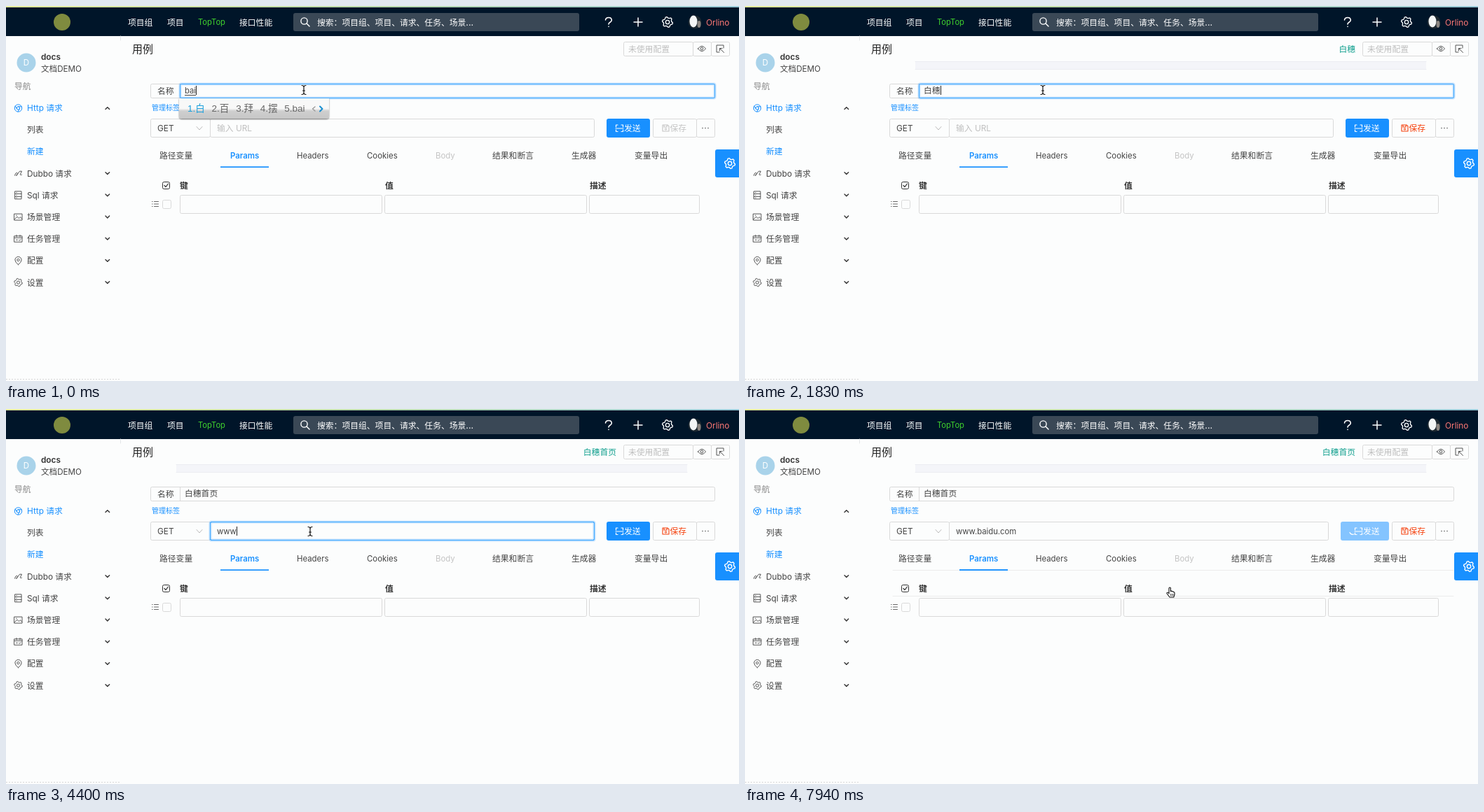
Animation, 1046 px wide and 536 px high, one loop 8 s. Source, as an HTML page:

```html
<!DOCTYPE html>
<html lang="zh-CN">
<head>
<meta charset="utf-8">
<style>
html, body { margin: 0; width: 100%; height: 100%; overflow: hidden; background: #fcfdfd; }
svg.full { position: absolute; left: 0; top: 0; }
text, .field { font: 11.8px Inter, "Noto Sans CJK SC", sans-serif; white-space: pre; }
.field { position: absolute; color: #444; }
#name { left: 255px; top: 111px; line-height: 21px; }
#url { left: 301px; top: 162px; line-height: 27px; font-size: 11.3px; }
u { font-size: 11.3px; text-underline-offset: 1.5px; }
.spell { text-decoration: underline dotted #e8504a 1.5px; text-underline-offset: 1.5px; }
.caret { display: inline-block; width: 1px; height: 13px; background: #222; vertical-align: -2px; }
.ime {
  position: absolute; top: 132px; height: 29px; line-height: 29px; padding: 0 8px 0 12px;
  display: flex; align-items: center; gap: 9.8px; white-space: nowrap; color: #666;
  font-family: "Liberation Sans", "Noto Sans CJK SC", sans-serif; font-size: 13.5px;
  background: linear-gradient(#f3f3f3, #d2d2d2); border-radius: 0 0 4px 4px;
  box-shadow: 0 1px 2px #777;
}
.ime.first { background: linear-gradient(#f8f8f8 50%, #cfcfcf 62%, #c6c6c6); }
.ime span:first-child { color: #1a9fdc; }
.ime svg { vertical-align: -2px; }
</style>
</head>
<body>
<svg class="full" id="base" width="1046" height="536"></svg>
<div id="live"></div>
<script>
const BLUE = '#1890ff', LINE = '#d9d9d9', INK = '#444';

const text = (x, y, s, c = INK, size = 11.8, weight = 400, anchor = 'start') =>
  `<text x="${x}" y="${y}" fill="${c}" text-anchor="${anchor}" style="font-size:${size}px;font-weight:${weight}">${s}</text>`;
const fill = (x1, y1, x2, y2, c, r = 0) =>
  `<rect x="${x1}" y="${y1}" width="${x2 - x1}" height="${y2 - y1}" rx="${r}" fill="${c}"/>`;
const frame = (x1, y1, x2, y2, c = LINE, w = 1, bg = 'none') =>
  `<rect x="${x1 + .5}" y="${y1 + .5}" width="${x2 - x1 - 1}" height="${y2 - y1 - 1}" rx="2" fill="${bg}" stroke="${c}" stroke-width="${w}"/>`;
const path = (d, c = '#555', w = 1, bg = 'none') =>
  `<path d="${d}" stroke="${c}" stroke-width="${w}" fill="${bg}" stroke-linecap="round" stroke-linejoin="round"/>`;
const dot = (x, y, r, c, ring = 'none', w = 1) =>
  `<circle cx="${x}" cy="${y}" r="${r}" fill="${c}" stroke="${ring}" stroke-width="${w}"/>`;
const at = (x, y, s) => `<g transform="translate(${x} ${y})">${s}</g>`;
const focusBox = (x1, y1, x2, y2) => frame(x1, y1, x2, y2, '#1890ff44', 4) + frame(x1, y1, x2, y2, '#40a9ff');

function gear(x, y, r, c, w = 1) {
  const pts = [];
  for (let i = 0; i < 24; i++) {
    const a = i * Math.PI / 12 + Math.PI / 24, k = i % 4 < 2 ? r : r * .78;
    pts.push((x + k * Math.cos(a)).toFixed(2) + ' ' + (y + k * Math.sin(a)).toFixed(2));
  }
  return path('M' + pts.join('L') + 'Z', c, w) + dot(x, y, r * .36, 'none', c, w);
}

function header() {
  return `<defs><linearGradient id="top"><stop stop-color="#e3e79a"/><stop offset=".5" stop-color="#b9d7a8"/>
    <stop offset="1" stop-color="#9bc9d8"/></linearGradient></defs>`
    + fill(0, 0, 1046, 2, 'url(#top)') + fill(0, 2, 1046, 43, '#001529')
    + dot(80, 23, 12, '#7f8b3f')
    + text(174, 27.5, '项目组', '#fff', 11.8, 500) + text(230, 27.5, '项目', '#fff', 11.8, 500)
    + text(274, 27, 'TopTop', '#3fd12e', 11.2) + text(333, 27.5, '接口性能', '#fff', 11.8, 500)
    + fill(410, 10, 818, 36, '#3a4856', 3)
    + dot(425.5, 21.5, 4.6, 'none', '#fff', 1.4) + path('M429 25L433 29', '#fff', 1.5)
    + text(444, 27.5, '搜索：项目组、项目、请求、任务、场景...', '#fff', 11.8, 500)
    + path('M855.5 20Q856 16.5 860 16.5T864.3 20Q864.3 22 862 23.3T860 26M860 29.3v.2', '#fff', 1.6)
    + path('M896 23h12M902 17v12', '#fff', 1.5) + gear(944, 23, 7.5, '#fff', 1.3)
    + dot(983, 23, 9.5, '#1d2830')
    + '<ellipse cx="981" cy="22" rx="5.5" ry="8.5" fill="#f4f6f6"/><ellipse cx="989" cy="26" rx="2.5" ry="5" fill="#8b8580"/>'
    + text(999, 28, 'Orlino', '#ff7875');
}

function sidebar() {
  const icons = [
    c => dot(0, 0, 5.2, 'none', c) + dot(0, 0, 2.2, 'none', c) + path('M0 -2.2H4.7M-1.9 1.1L-4.3 -3M1.9 1.1L-.5 5', c),
    () => path('M-5 3Q-4 -1 -2 -1T-2 3Q-5 4 -1 1L2 -3H5L3 1Q2 3 5 2'),
    () => path('M-4.5 -5.5H4.5V5.5H-4.5ZM-4.5 -2H4.5M-4.5 2H4.5M-2.5 -3.8h.3M-2.5 0h.3M-2.5 3.8h.3'),
    () => path('M-5.5 -4.5H5.5V4.5H-5.5ZM-5 3L-1.5 -.5L1 2L3 0L5 2.5M-3 -2.3h.6'),
    () => path('M-5.5 -4H5.5V4.5H-5.5ZM-5.5 -1.5H5.5M-2.5 -5.5V-3M2.5 -5.5V-3M-3 1.5H-1M1 1.5L2 2.5L3.5 .8'),
    () => path('M0 5.8Q-4.6 2 -4.6 -1A4.6 4.6 0 0 1 4.6 -1Q4.6 2 0 5.8Z') + dot(0, -1, 1.7, 'none', '#555'),
    () => gear(0, 0, 5.8, '#555')
  ];
  const names = ['Http 请求', 'Dubbo 请求', 'Sql 请求', '场景管理', '任务管理', '配置', '设置'];
  const rows = names.map((name, i) => {
    const y = i ? 208 + 31.2 * i : 146, c = i ? INK : BLUE;
    return at(17.5, y, icons[i](c)) + text(30, y + 4.3, name, c)
      + path(i ? `M142 ${y - 1.5}l2.8 2.8l2.8 -2.8` : 'M142 147.5l2.8 -2.8l2.8 2.8', '#333', 1.4);
  });
  return dot(29, 81, 13.5, '#a9d3ea') + text(29, 85, 'D', '#fff', 11.5, 400, 'middle')
    + text(50, 77, 'docs', '#333', 11.8, 600) + text(50, 94.3, '文档DEMO', INK, 11.6)
    + text(12, 118.5, '导航', '#888') + rows.join('')
    + text(30, 181.3, '列表') + text(30, 212.3, '新建', BLUE)
    + path('M163.5 43V49', '#e4e6e8')
    + '<path d="M0 533.5H163" stroke="#d6d6d6" stroke-dasharray="2 2"/>';
}

function content() {
  const tabs = [[219, '路径变量'], [415, 'Headers'], [515, 'Cookies'], [613, 'Body'], [694, '结果和断言'], [807, '生成器'], [897, '变量导出']];
  return text(180, 66.5, '用例', '#222', 15)
    + frame(881, 51, 981, 72) + frame(980, 51, 1007, 72) + frame(1006, 51, 1033, 72)
    + text(888, 65.7, '未使用配置', '#bfbfbf')
    + path('M987.5 61Q993 53.5 998.5 61Q993 68.5 987.5 61Z') + dot(993, 61, 1.8, 'none', '#555')
    + path('M1018 66H1014V56H1024V60M1018.5 60.5L1024.5 66.5M1018.5 64V60.5H1022')
    + frame(206, 111, 1012, 132) + path('M248.5 111.5V131.5', LINE) + text(216, 125.5, '名称')
    + text(208, 148.5, '管理标签', BLUE, 10)
    + frame(206, 161, 292, 188) + text(216, 179, 'GET') + path('M272 172.5L276 177L280 172.5', '#bbb')
    + frame(923, 161, 986, 188) + frame(985, 161, 1012, 188)
    + [994, 998, 1002].map(x => dot(x, 174.5, .8, '#555')).join('')
    + tabs.map(([x, s]) => text(x, 217.5, s, s == 'Body' ? '#c4c4c4' : INK, x > 400 && x < 650 ? 11.4 : 11.8)).join('')
    + text(320, 217.5, 'Params', BLUE, 11.4, 600) + fill(306, 229.3, 375, 231, BLUE)
    + frame(223, 251, 234, 262, '#333') + path('M226 256.5L228 258.7L231.5 254', '#333', 1.2)
    + [[248, '键'], [541, '值'], [833, '描述']].map(([x, s]) => text(x, 260.5, s, '#333', 11.8, 700)).join('')
    + [279.5, 283, 286.5].map(y => path(`M208.5 ${y}h.6M211.5 ${y}h6`, '#666')).join('')
    + frame(223, 277, 236, 290)
    + [[248, 537], [540, 829], [832, 990]].map(([a, b]) => frame(a, 270, b, 297)).join('')
    + fill(1012, 205, 1050, 245, BLUE, 3) + gear(1033, 225, 7.5, '#fff', 1.4);
}

// each step changes part of the state and holds until the next one
const H = '和 会 好 还 很', HS = '还是 回收 护士 划算 好像是', NAME = '白穗';
const steps = [
  [0, { pre: '', py: 'bai', list: '白 百 拜 摆 bai', focus: 'name', caret: 1, url: '', title: '', x: 425, y: 120, send: BLUE }],
  [150, { py: 'baisu', list: '白 百 拜 摆 败诉' }],
  [300, { py: 'baisui', list: '白穗 百岁 白 百 拜' }],
  [450, { pre: NAME, py: '', title: NAME }],
  [600, { caret: 0 }],
  [790, { caret: 1, py: 'h', list: H }],
  [1090, { py: 'hs', list: HS }],
  [1390, { py: 'hso', list: '受 手 @ 收 胡搜' }],
  [1540, { py: 'hs', list: HS }],
  [1690, { py: 'h', list: H }],
  [1830, { py: '' }],
  [2280, { py: 's', list: '是 所 说 上 三' }],
  [2430, { py: 'sho', list: '受 手 @ 收 搜索' }],
  [2580, { py: 'shou', list: '受 手 @ 收 瘦' }],
  [2880, { py: 'shouy', list: '首页 收 手 受 瘦' }],
  [3030, { py: 'shouye', list: '首页 手 收 受 瘦' }],
  [3180, { pre: NAME + '首页', py: '', title: NAME + '首页' }],
  [3330, { caret: 0, y: 124 }],
  [3470, { x: 428, y: 140 }],
  [3620, { x: 432, y: 162, hover: 1 }],
  [3770, { x: 434, y: 175 }],
  [4100, { focus: 'url', caret: 1 }],
  [4250, { url: 'w' }],
  [4400, { url: 'www' }],
  [4690, { caret: 0 }],
  [4990, { caret: 1, url: 'www.' }],
  [5140, { url: 'www.b' }],
  [5290, { url: 'www.ba' }],
  [5440, { url: 'www.bai', spell: 1 }],
  [5590, { url: 'www.baidu' }],
  [5740, { url: 'www.baidu.' }],
  [5880, { url: 'www.baidu.c' }],
  [6030, { url: 'www.baidu.com', spell: 0 }],
  [6320, { caret: 0 }],
  [6470, { x: 446, y: 192, hand: 0 }],
  [6620, { x: 530, y: 226, tabLine: [387, 868] }],
  [6770, { x: 660, y: 234, hand: 1 }],
  [6910, { x: 780, y: 230 }],
  [7060, { x: 860, y: 207 }],
  [7200, { x: 884, y: 185, send: '#40a9ff' }],
  [7350, { send: '#2b97f5' }],
  [7490, { focus: '', hover: 0, busy: 1, send: '#84c4ff', tabLine: [211, 1011] }],
  [7640, { x: 850, y: 198 }],
  [7790, { x: 725, y: 238 }],
  [7940, { x: 607, y: 262, headLine: 1 }]
];

const palm = `<svg width="29" height="18">${path('M5 10V4M8 9V2M11 9V3M14 10V5', '#f8b62d', 2.4)}
  ${path('M5 9H14V12Q13 16 9.5 16Q6 16 2 10.5L5 11.5Z', '#f8b62d', 1.6, '#f8b62d')}${frame(20, 2, 28, 9, '#777')}${path('M22 5.5h4', '#777')}</svg>`;

function ime(s) {
  if (!s.py) return '';
  const items = s.list.split(' ').map((w, i) => `<span>${i + 1}.${w == '@' ? palm : w}</span>`).join('');
  const arrows = `<svg width="17" height="10">${path('M5 2L1.5 5L5 8', '#999', 1.4)}${path('M12 1.5L15.5 5L12 8.5', '#1a8fd0', 2)}</svg>`;
  return `<div class="ime${s.py == 'bai' ? ' first' : ''}" style="left:${s.pre ? 269 : 247}px">${items}${arrows}</div>`;
}

function pointer(s) {
  const beam = 'M-3 -6.5Q0 -6.5 0 -4Q0 -6.5 3 -6.5M0 -5V5M-3 6.5Q0 6.5 0 4Q0 6.5 3 6.5M-1.5 1H1.5';
  const hand = 'M-2 1V-5.5Q-2 -7 -.8 -7T.4 -5.5V-1.5Q2 -2.5 2.6 -1Q4.2 -1.7 4.6 -.2Q6 -.5 6 1.2V3Q5.5 5 4.8 7H-1L-4.8 2Q-5.5 .3 -4 .2T-2 2Z';
  return at(s.x, s.y, s.hand ? path(hand, '#111', 1.1, '#fff') + path('M.5 2.5V5M2.3 2.5V5M4 2.5V5', '#111', .7)
    : path(beam, '#fff', 2.6) + path(beam, '#111', 1.2));
}

function draw(s) {
  const left = s.busy ? 850 : 857, right = s.busy ? 833 : 840;
  const save = s.title ? '#f5410d' : '#c4c4c4', caret = '<i class="caret"></i>';
  const svg = body => `<svg class="full" width="1046" height="536">${body}</svg>`;
  const ui = (s.title ? fill(243, 79, 972, 91, '#f4f5f9') + path('M243 79.5H972M243 90.5H972', '#ebecf1') : '')
    + text(871, 65.5, s.title, '#13a08f', 11.8, 400, 'end')
    + (s.tabLine ? path(`M${s.tabLine[0]} 230.5H${s.tabLine[1]}`, '#ececec') + fill(306, 229.3, 375, 231, BLUE) : '')
    + (s.headLine ? path('M211 267.5H1011', '#ececec') : '')
    + frame(291, 161, right, 188, s.hover ? '#40a9ff' : LINE)
    + (s.focus == 'name' ? focusBox(248, 111, 1012, 132) : s.focus == 'url' ? focusBox(291, 161, 840, 188) : '')
    + (s.url ? '' : text(301, 179.3, '输入 URL', '#bfbfbf'))
    + fill(left, 161, 919, 188, s.send, 3)
    + path('M873 170H870.5V173M878 170H880.5V173M873 179.5H870.5V177M878 179.5H880.5V177M870 175H881', '#fff', 1.2)
    + (s.busy ? path('M863 176.5A5 5 0 0 0 869 179', '#fff', 1.2) : '')
    + text(882, 178.8, '发送', '#fff', 11.8, 500)
    + path('M937 170H944L946 172V179H937ZM939 170V173H943V170', save, 1.1) + dot(941.5, 176, 1.2, 'none', save)
    + text(947.5, 178.8, '保存', save);
  return svg(ui)
    + `<div class="field" id="name">${s.pre}<u>${s.py}</u>${s.focus == 'name' && s.caret ? caret : ''}</div>`
    + `<div class="field" id="url"><span class="${s.spell ? 'spell' : ''}">${s.url}</span>${s.focus == 'url' && s.caret ? caret : ''}</div>`
    + ime(s) + svg(pointer(s));
}

document.getElementById('base').innerHTML = header() + sidebar() + content();
const live = document.getElementById('live');
let shown = 0;
function tick() {
  const t = performance.now() % 8000;
  const past = steps.filter(([from]) => from <= t);
  if (past.length != shown) {
    shown = past.length;
    live.innerHTML = draw(Object.assign({}, ...past.map(p => p[1])));
  }
  requestAnimationFrame(tick);
}
tick();
</script>
</body>
</html>
```
